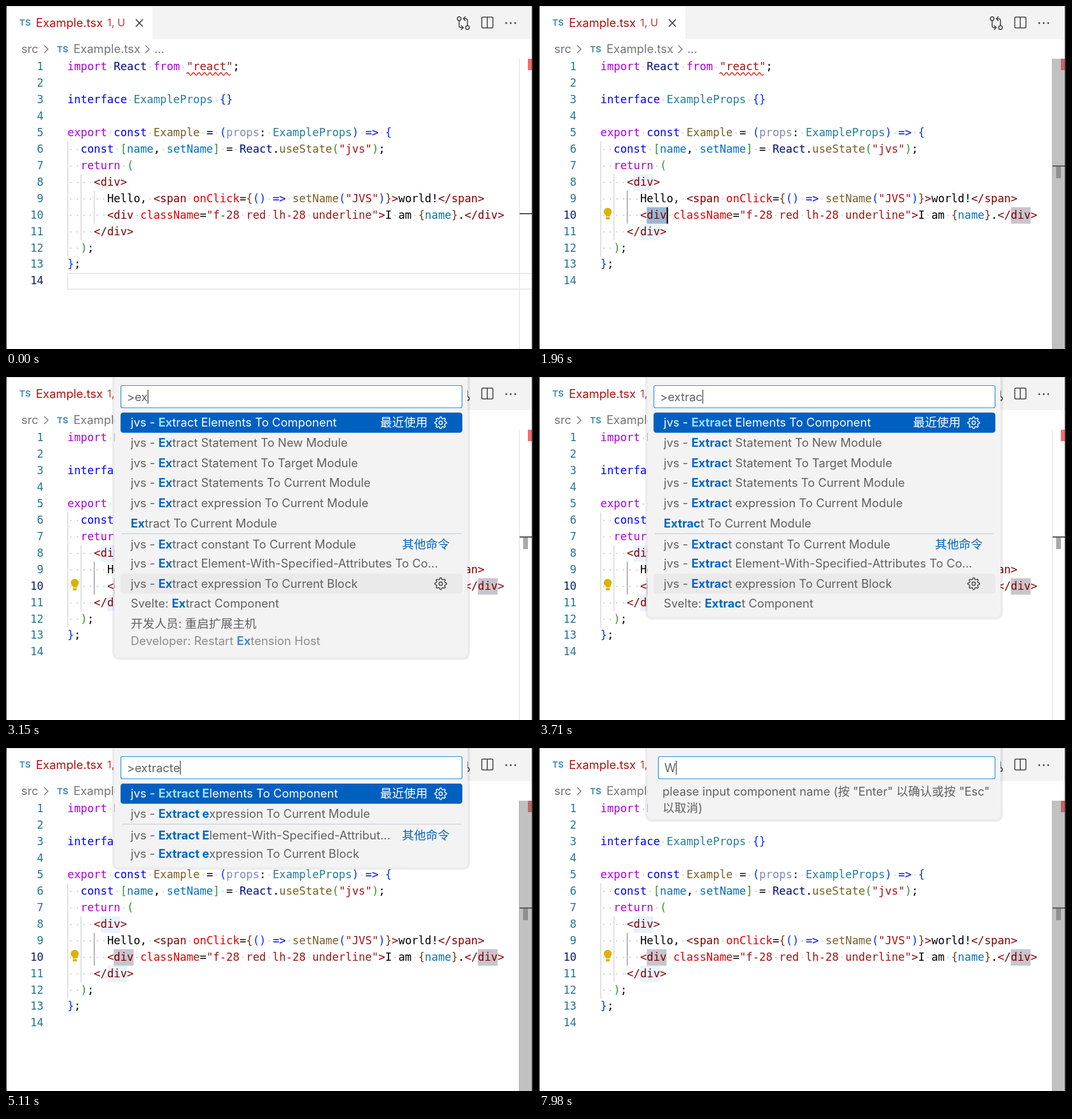
Write an HTML page that moves like this. It is 828 px wide and 540 px high and loops after 8000 ms.

```html
<!DOCTYPE html>
<html lang="en">
<head>
<meta charset="utf-8">
<title>Editor</title>
<style>
html, body { margin: 0; width: 100%; height: 100%; overflow: hidden; background: #fff; }
svg { display: block; }
text { white-space: pre; font: 18.45px Inter, "Noto Sans CJK SC", "Noto Sans CJK", sans-serif; }
.cjk { font-size: 18.72px; }
.code { font: 17.28px "DejaVu Sans Mono", monospace; }
</style>
</head>
<body>
<svg id="stage" width="828" height="540" viewBox="0 0 828 540">
  <rect width="828" height="540" fill="#fff"/>
  <g id="chrome"></g>
  <g id="marks"></g>
  <g id="code"></g>
  <g id="over"></g>
  <rect id="slider" x="806" y="83" width="20.2" height="457" fill="#646464"/>
  <g id="popup"></g>
  <rect id="listSlider" x="710" y="56.5" width="14" height="28.5" fill="#646464"/>
  <path d="M0 0H1V540H0ZM826.2 0H828V540H826.2Z" fill="#222"/>
</svg>
<script>
const LOOP = 8000, CW = 10.4, LH = 25.92, X0 = 96.5, Y0 = 83.5;
const GREY = '#616161', BLUE = '#0066bf';
const $ = id => document.getElementById(id);
const esc = s => s.replace(/&/g, '&amp;').replace(/</g, '&lt;').replace(/>/g, '&gt;');
const colX = c => X0 + c * CW;
const lineY = n => Y0 + (n - 1) * LH;
const rect = (x, y, w, h, fill, more = '') =>
  `<rect x="${x}" y="${y}" width="${w}" height="${h}" fill="${fill}" ${more}/>`;
const line = (d, color, w = 1.44) =>
  `<path d="${d}" fill="none" stroke="${color}" stroke-width="${w}"/>`;
const dot = (x, y, r, fill) => `<circle cx="${x}" cy="${y}" r="${r}" fill="${fill}"/>`;
const raw = (x, y, inner, fill, more = '') =>
  `<text x="${x}" y="${y}" fill="${fill}" ${more}>${inner}</text>`;
const mixed = s => esc(s).replace(/[\u4e00-\u9fff]+/g, m => `<tspan class="cjk">${m}</tspan>`);
const label = (x, y, s, fill, more) => raw(x, y, mixed(s), fill, more);

// Code: tokens split by "~", the first character picks the colour
const COLORS = {
  k: '#af00db', v: '#001080', b: '#0000ff', s: '#a31515', t: '#267f99', f: '#795e26',
  c: '#0070c1', p: '#000', 1: '#0431fa', 2: '#319331', 3: '#7b3814', g: '#800000',
  a: '#e50000', u: '#8088b8'
};
const CODE = [
  'kimport~p ~vReact~p ~kfrom~p ~s"react"~p;',
  '',
  'binterface~p ~tExampleProps~p ~1{}',
  '',
  'kexport~p ~bconst~p ~fExample~p = ~1(~uprops~p: ~tExampleProps~1)~p ~b=>~p ~1{',
  'p  ~bconst~p ~2[~cname~p, ~csetName~2]~p = ~vReact~p.~fuseState~2(~s"jvs"~2)~p;',
  'p  ~kreturn~p ~2(',
  'p    ~g<div>',
  'p      Hello, ~g<span~p ~aonClick~p=~3{~1()~p ~b=>~p ~fsetName~1(~s"JVS"~1)~3}~g>~pworld!~g</span>',
  'p      ~g<div~p ~aclassName~p=~s"f-28 red lh-28 underline"~g>~pI am ~3{~cname~3}~p.~g</div>',
  'p    ~g</div>',
  'p  ~2)~p;',
  '1}~p;',
  ''
];

function codeText() {
  let out = '';
  CODE.forEach((src, i) => {
    let col = 0;
    const y = lineY(i + 1) + 17.9;
    for (const tok of src ? src.split('~') : []) {
      const s = tok.slice(1);
      [...s].forEach((ch, j) => {
        if (ch === ' ') out += dot(colX(col + j + .5), y - 5, 1.15, '#cbcbcb');
      });
      const body = s.trimStart();
      if (body) out += raw(colX(col + s.length - body.length), y, esc(body), COLORS[tok[0]], 'class="code"');
      col += s.length;
    }
  });
  let wave = `M${colX(18)} 107q2.16 -4 4.32 0`;
  for (let x = 4.32; x < 7 * CW - 4.4; x += 4.32) wave += 't4.32 0';
  return out + line(wave, '#e51400', 1.3);
}

const chevron = x => line(`M${x} 62l6 6l-6 6`, '#767676', 1.4);
function chrome() {
  const ts = (x, y) => raw(x, y, 'TS', '#4a90b4', 'style="font-size:13.6px;font-weight:700"');
  const ink = '#424242';
  return rect(230, 0, 598, 52, '#f3f3f3') + rect(0, 0, 828, 1, '#d8d8d8') +
    ts(21, 31) + label(47, 32.8, 'Example.tsx', '#b01011') +
    label(159, 32.4, '1, U', '#bd3a3b', 'style="font-size:16.4px"') +
    line('M204 21l11 11.500m0 -11.500l-11 11.500', '#333', 1.5) +
    label(24, 74.3, 'src', '#767676') + chevron(60) + ts(80, 72.5) +
    label(106, 74.3, 'Example.tsx', '#767676') + chevron(219) + label(233, 74.3, '...', '#767676') +
    `<g fill="none" stroke="${ink}" stroke-width="1.5">
      <circle cx="712" cy="20" r="2.9"/><circle cx="725" cy="34" r="2.9"/>
      <path d="M712 23V31Q712 34 715 34H718M715 30.500L718.500 34L715 37.500M725 31V23Q725 20 722 20H719M722 16.500L718.500 20L722 23.500"/>
      <rect x="747.500" y="17.500" width="17.500" height="17" rx="1.500"/><path d="M756.200 17.500v17"/>
    </g>` +
    [786, 793, 800].map(x => dot(x, 27, 1.4, ink)).join('');
}

function marks(s) {
  let out = '';
  const guide = (c, from, to, color) =>
    line(`M${colX(c) + .5} ${lineY(from)}V${lineY(to + 1)}`, color, 1.3);
  const word = (n, c, fill) => rect(colX(c), lineY(n), 3 * CW, LH, fill);
  if (s.mode === 'idle')
    out += rect(97, lineY(14) + .7, 735, LH - 1.4, 'none', 'stroke="#e2e2e2" stroke-width="1.44"');
  if (s.mode === 'caret') {
    out += rect(97, lineY(10) + .7, 735, LH - 1.4, 'none', 'stroke="#e6e6e6" stroke-width="1.44"');
    for (const [n, c] of [[7, 9], [12, 2]])
      out += rect(colX(c) + .5, lineY(n) + .7, CW - 1, LH - 1.4, '#e5f0e5', 'stroke="#b9b9b9"');
  }
  if (s.mode === 'word') {
    out += word(8, 5, '#e9f2fd') + word(11, 6, '#e9f2fd') +
      word(10, 7, s.popup ? '#c6c6cc' : '#98b7d3') + word(10, 62, '#c6c6cc');
  }
  out += guide(0, 6, 12, '#d3d3d3') + guide(2, 8, 11, '#d3d3d3') +
    guide(4, 9, 10, s.mode === 'idle' ? '#d3d3d3' : '#939393');
  const active = s.mode === 'idle' ? 14 : 10;
  CODE.forEach((_, i) => {
    out += raw(59, lineY(i + 1) + 17.9, i + 1, i + 1 === active ? '#0b216f' : '#237893',
      'class="code" text-anchor="end"');
  });
  return out;
}

function over(s) {
  let out = line('M806.5 83V540', '#dedede', 1) + rect(820, 83, 6.5, 18, '#f8696b') +
    rect(807, s.mode === 'idle' ? 326 : 251, 20, 1.8, '#424249');
  if (s.mode === 'word') out += rect(812.5, 253, 7.5, 18, '#a9a9a9');
  if (s.bulb)
    out += dot(108, 324, 6.2, '#ddb100') + rect(105, 327, 6.2, 9, '#ddb100', 'rx="1"') +
      line('M105 331.800h6.2', '#fff', 1);
  if (s.caret) out += rect(colX(s.mode === 'word' ? 10 : 8), lineY(10), 2.2, LH, '#000');
  return out;
}

// Command list
const jvs = s => 'jvs - ' + s;
const RECENT = ['Clean By Re-Order Global Statements', 'Extract Elements To Component',
  'Extract Statement To New Module', 'Extract Statement To Target Module',
  'Extract Statements To Current Module', 'Clean By Re-Name Identifier In Module',
  'Extract expression To Current Module', 'Clean By Remove Unused Code In Module',
  'Generate New Function Component In Module'].map(jvs);
const ALONE = 'Extract To Current Module';
const EXTRACT = [RECENT[1], RECENT[2], RECENT[3], RECENT[4], RECENT[6], ALONE,
  jvs('Extract constant To Current Module'),
  jvs('Extract Element-With-Specified-Attributes To Co...'),
  jvs('Extract expression To Current Block'), 'Svelte: Extract Component'];
const SAVE = ['文件: 保存但不格式化', 'File: Save without Formatting', ['⌘', 'K', 'S']];
const HOST = ['开发人员: 重启扩展主机', 'Developer: Restart Extension Host', []];

function listFor(q) {
  if (q.length < 2) return { rows: [...RECENT, ALONE], tail: SAVE, hover: 8 };
  if (q.length < 8) return { rows: EXTRACT, sep: 6, tail: q.length < 4 ? HOST : null, hover: 8 };
  return { rows: [EXTRACT[0], EXTRACT[4], jvs('Extract Element-With-Specified-Attribut...'), EXTRACT[8]], sep: 2 };
}

function bold(s, q, color) {
  const m = q && s.match(new RegExp(q.replace('te', 't e'), 'i'));
  if (!m) return mixed(s);
  const end = m.index + m[0].length;
  return mixed(s.slice(0, m.index)) +
    `<tspan font-weight="700" fill="${color}">${esc(m[0])}</tspan>` + mixed(s.slice(end));
}

function gear(x, y, color) {
  let d = '';
  for (let i = 0; i < 32; i++) {
    const r = i % 4 < 2 ? 9.2 : 6.9, a = (i - .5) * Math.PI / 16;
    d += (i ? 'L' : 'M') + (x + r * Math.cos(a)).toFixed(2) + ' ' + (y + r * Math.sin(a)).toFixed(2);
  }
  return line(d + 'Z', color, 1.4) +
    `<circle cx="${x}" cy="${y}" r="2.7" fill="none" stroke="${color}" stroke-width="1.4"/>`;
}

function keycap(x, w, y, s) {
  return rect(x, y, w, 25, '#ebebeb', 'rx="4" stroke="#cfcfcf" stroke-width="1.2"') +
    line(`M${x + 3} ${y + 25}h${w - 6}`, '#b8b8b8', 1.3) +
    label(x + w / 2, y + 18, s, '#555', 'text-anchor="middle" style="font-size:15.5px"');
}

function panel(bottom, inputX) {
  return `<path d="M167 0H729V${bottom - 8}q0 12 -12 12H179q-12 0 -12 -12Z" fill="#000" opacity=".075"/>` +
    `<path d="M170.500 0H725V${bottom - 8}q0 8 -8 8H178.500q-8 0 -8 -8Z" fill="#f3f3f3"/>` +
    rect(170.5, 0, 554.5, 1, '#dcdcdc') +
    rect(inputX + .5, 13.5, 716 - inputX, 35, '#fff', 'rx="2.6" stroke="#2b93dd" stroke-width="1.2"');
}

function palette(q) {
  const { rows, sep, tail, hover } = listFor(q), H = 31.68, top = 56;
  const end = top + rows.length * H;
  let out = panel(end + (tail ? 63.4 : 0) + 5, 180);
  rows.forEach((s, i) => {
    const y = top + i * H, sel = !i;
    const base = y + 22.3 + (i === sep ? 2 : 0);
    if (sel) out += rect(180, y, 537, H, '#0060c0', 'rx="4.3"');
    if (i === hover) out += rect(180, y, 537, H, '#eaeaea', 'rx="4.3"');
    if (i === sep)
      out += line(`M182 ${y + .6}H715`, '#cccedb', 1.2) +
        label(697, base, '其他命令', BLUE, 'text-anchor="end"');
    out += raw(196, base, bold(s, q, sel ? '#9dddff' : BLUE), sel ? '#fff' : GREY);
    if (sel) out += label(662.5, base, '最近使用', '#fff', 'text-anchor="end"');
    if (sel || i === hover) out += gear(683, y + 16, sel ? '#fff' : '#424242');
  });
  if (tail) {
    const [name, sub, keys] = tail;
    out += raw(196, end + 22.5, bold(name, q, BLUE), GREY) +
      raw(196, end + 49.5, bold(sub, q, BLUE), GREY, 'opacity=".7"');
    keys.forEach((k, i) => out += keycap([584.5, 622.5, 664.5][i], i ? 26 : 31, end + 3.5, k));
  }
  return out;
}

const prompt = () => panel(112, 187) +
  label(194, 75.2, 'please input component name (按 "Enter" 以确认或按 "Esc"', GREY) +
  label(194, 101.2, '以取消)', GREY);

const TYPED = [[2310, ''], [2730, 'e'], [3150, 'ex'], [3430, 'ext'], [3500, 'extr'], [3570, 'extra'],
  [3710, 'extrac'], [3920, 'extract'], [4130, 'extracte']];
const ENTER = 5460;
const within = (t, a, b) => t >= a && t < b;

function stateAt(t) {
  const s = {
    mode: t < 910 ? 'idle' : t < 1750 ? 'caret' : 'word',
    popup: t < 2310 ? '' : t < ENTER ? 'palette' : 'prompt',
    bulb: t >= 1960,
    caret: within(t, 910, 1410) || within(t, 1750, 2310),
    text: '', blink: true
  };
  if (s.popup === 'palette') {
    s.text = TYPED.filter(k => k[0] <= t).pop()[1];
    s.blink = !within(t, 4620, 5110);
  }
  if (s.popup === 'prompt') {
    s.text = t >= 7770 ? 'W' : '';
    s.blink = !within(t, 5950, 6440) && !within(t, 7000, 7490);
  }
  return s;
}

function popup(s) {
  if (!s.popup) return '';
  const pal = s.popup === 'palette';
  return (pal ? palette(s.text) : prompt()) +
    label(pal ? 190 : 197, 38, (pal ? '>' : '') + s.text, GREY, 'id="typed"') +
    rect(197, 20, 1.4, 22, s.blink ? '#555' : 'none', 'id="bar"');
}

const clamp = v => Math.max(0, Math.min(1, v));
const ramp = (t, a, len) => clamp((t - a) / len);
let shown = '';

function draw(t) {
  const s = stateAt(t), key = JSON.stringify(s);
  if (key !== shown) {
    shown = key;
    $('marks').innerHTML = marks(s);
    $('over').innerHTML = over(s);
    $('popup').innerHTML = popup(s);
    const typed = $('typed');
    if (typed) $('bar').setAttribute('x', +typed.getAttribute('x') + typed.getComputedTextLength() - .2);
  }
  const show = ramp(t, 910, 100) - ramp(t, 2310, 800) + ramp(t, 4130, 100);
  $('slider').setAttribute('opacity', .4 * show);
  $('listSlider').setAttribute('opacity', t < 2310 ? 0 : .5 * (1 - ramp(t, 2700, 400)));
}

$('chrome').innerHTML = chrome();
$('code').innerHTML = codeText();
const start = performance.now();
function tick() {
  draw((performance.now() - start) % LOOP);
  requestAnimationFrame(tick);
}
tick();
</script>
</body>
</html>
```
